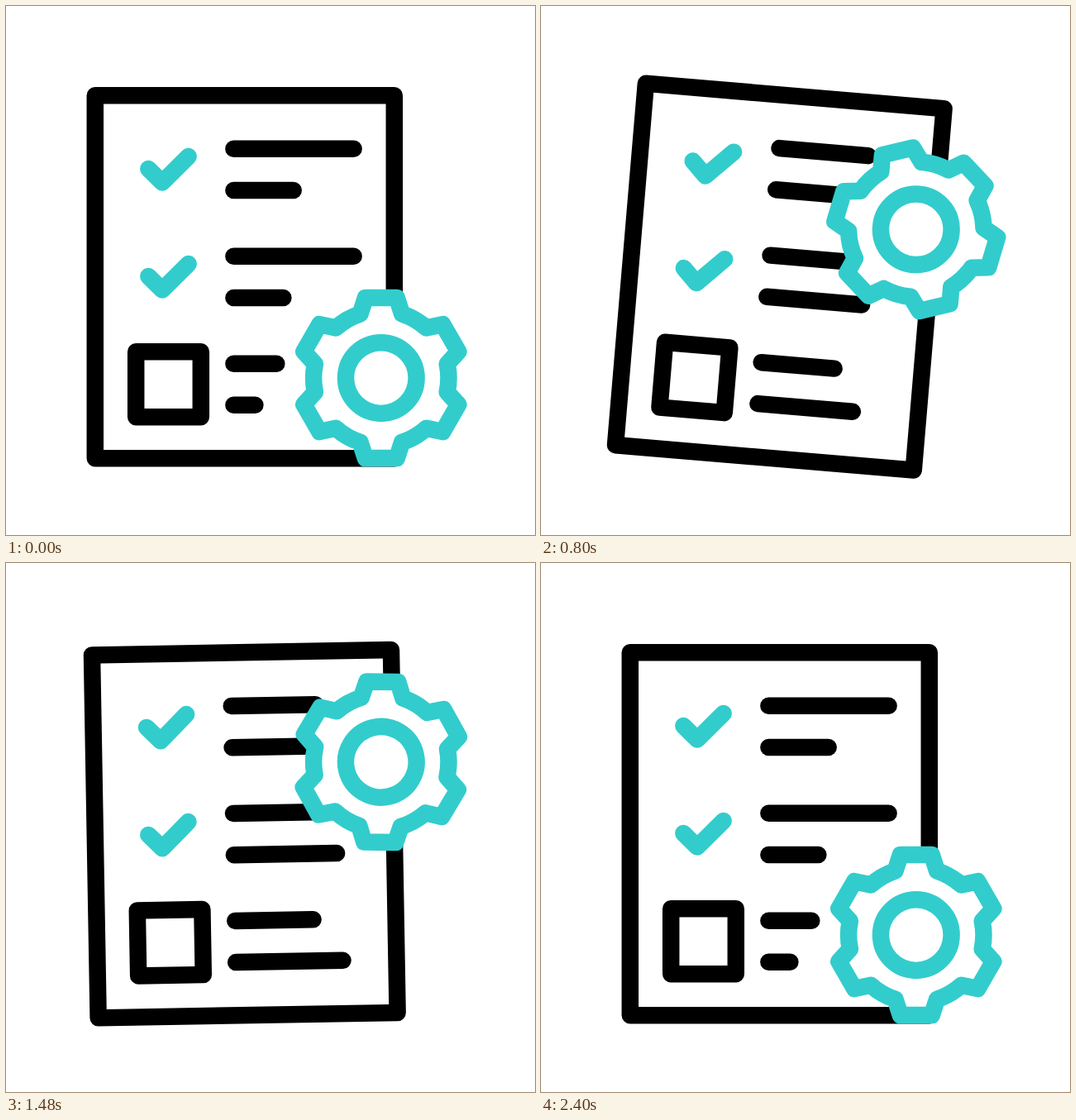
Recreate the animation shown at these times as an HTML page. Size 640 px wide and 640 px high, loop 2.42 s.

```html
<!DOCTYPE html>
<html lang="en">
<head>
<meta charset="utf-8">
<title>Checklist with gear</title>
<style>
  html, body { margin: 0; width: 100%; height: 100%; overflow: hidden; background: #fff; }
  svg { display: block; width: 100vw; height: 100vh; }
  svg * { stroke-width: 20.5; stroke-linecap: round; stroke-linejoin: round; }
  #sheet { fill: none; stroke: #000; }
  #sheet .tick, #gear { stroke: #33cccc; }
  #gear { fill: #fff; }
</style>
</head>
<body>
<svg viewBox="0 0 640 640">
  <g id="sheet">
    <path d="M107.8 108.2H469.8V547.2H107.8Z"/>
    <path class="tick" d="M172.3 196.9L189 213.5L220.7 181.9"/>
    <path class="tick" d="M172.3 326.9L189 343.5L220.7 311.9"/>
    <path d="M157.2 418.2H235.8V497.2H157.2Z"/>
  </g>
  <g id="gear">
    <path id="rim"/>
    <circle r="42.8"/>
  </g>
</svg>
<script>
const LOOP = 2420, STEP = 20, SWING = 600, HALF = 1200, FULL = 2400;
const TILT = [0, 10, -10, 10, 0];
const LINE_X = 275.4;
// y, resting length, change in length at mid-loop
const LINES = [
  [172.7, 145.2, -50.6],
  [223, 72.3, 31.6],
  [302.7, 145.2, -55.6],
  [353, 60, 74.6],
  [432.7, 51.9, 49.3],
  [482.8, 26, 120]
];
const sheet = document.getElementById('sheet');
const gear = document.getElementById('gear');

const ease = u => u * u * (3 - 2 * u);

function gearPath(teeth, tip, halfTip, root, rootAngle) {
  const rx = root * Math.sin(rootAngle), ry = -root * Math.cos(rootAngle);
  const corners = [[-rx, ry], [-halfTip, -tip], [halfTip, -tip], [rx, ry]];
  let d = '';
  for (let i = 0; i < teeth; i++) {
    const a = i * 2 * Math.PI / teeth, c = Math.cos(a), s = Math.sin(a);
    corners.forEach(([x, y], k) => {
      const cmd = k ? 'L' : i ? `A${root} ${root} 0 0 1 ` : 'M';
      d += `${cmd}${(x * c - y * s).toFixed(2)} ${(x * s + y * c).toFixed(2)}`;
    });
  }
  return `${d}A${root} ${root} 0 0 1 ${-rx} ${ry}Z`;
}

document.getElementById('rim').setAttribute('d', gearPath(6, 97, 19, 81.7, Math.PI / 10));

const lines = LINES.map(() =>
  sheet.appendChild(document.createElementNS('http://www.w3.org/2000/svg', 'path')));

function draw(t) {
  const leg = Math.min(Math.floor(t / SWING), TILT.length - 2);
  const tilt = TILT[leg] + (TILT[leg + 1] - TILT[leg]) * ease(t / SWING - leg);
  const lift = ease((t < HALF ? t : FULL - t) / HALF);
  const spin = 180 * ease(t / FULL);

  sheet.setAttribute('transform', `rotate(${tilt} 288.9 327.7)`);
  gear.setAttribute('transform', `translate(453.8 ${450.1 - 242.8 * lift}) rotate(${spin})`);
  LINES.forEach(([y, len, grow], i) =>
    lines[i].setAttribute('d', `M${LINE_X} ${y}h${len + grow * lift}`));
}

const start = performance.now();
function tick() {
  const t = (performance.now() - start) % LOOP;
  draw(Math.floor(t / STEP) * STEP);
  requestAnimationFrame(tick);
}
tick();
</script>
</body>
</html>
```
